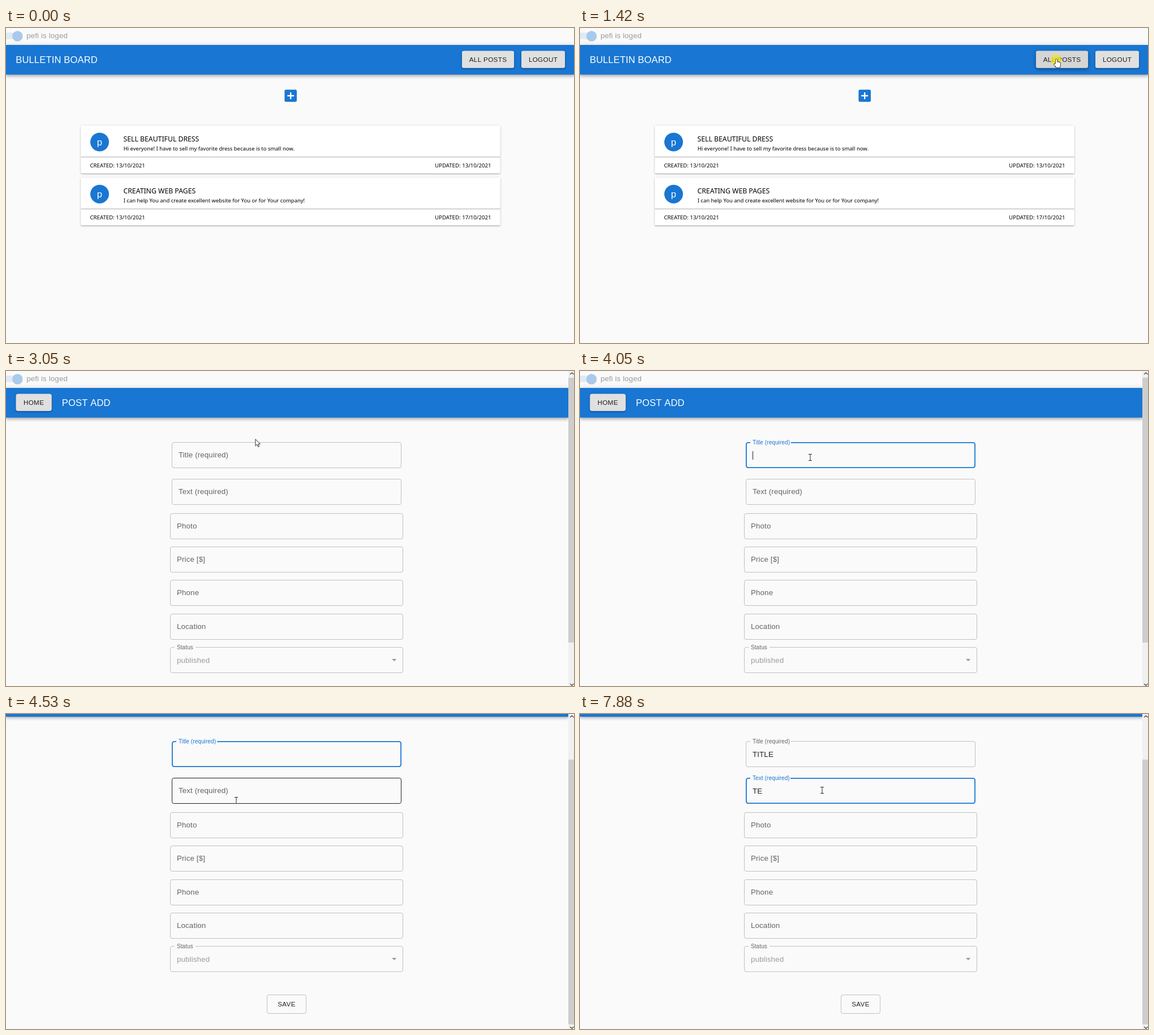
An HTML page with a canvas for the animation above (8 s loop, 1004 by 558 pixels).

```html
<!DOCTYPE html>
<html lang="en">
<head>
<meta charset="utf-8">
<title>Bulletin board</title>
<style>
html, body { margin: 0; width: 100%; height: 100%; overflow: hidden; background: #fafafa; }
canvas { display: block; }
</style>
</head>
<body>
<canvas id="stage" width="1004" height="558"></canvas>
<script>
const ctx = document.getElementById('stage').getContext('2d');
const W = 1004, H = 558, LOOP = 8000;
const BLUE = '#1976d2', PAGE = '#fafafa', INK = 'rgba(0,0,0,.87)';
const SOFT = 'rgba(0,0,0,.6)', FAINT = 'rgba(0,0,0,.38)', LINE = 'rgba(0,0,0,.23)';
const SANS = '"Liberation Sans", Arial, sans-serif';
const HUMAN = '"Noto Sans", "Open Sans", sans-serif';

const TO_LIST = 1630, TO_FORM = 2820, SCROLL_START = 4230;
const FOCUS_TITLE = 3850, TYPE_TITLE = 5600, FOCUS_TEXT = 6740, TYPE_TEXT = 7750;
const BLINK = 540, CLICKS = [1400, 2690, 3770, 6680], CLICK_LENGTH = 130;

// Pointer start and moves: [from time, to time, x, y]
const ENTER = { t: 190, x: 958, y: 556 };
const MOVES = [
  [190, 930, 848, 83], [930, 1220, 842, 55], [1640, 2360, 498, 127],
  [2840, 3110, 425, 119], [3110, 3520, 407, 153], [6470, 6680, 428, 135]
];

const DRESS = ['p', 'SELL BEAUTIFUL DRESS', 'Hi everyone! I have to sell my favorite dress because is to small now.', '13'];
const WEB = ['p', 'CREATING WEB PAGES', 'I can help You and create excellent website for You or for Your company!', '17'];
const CAR = ['m', 'SELL RED CAR', 'I want to sell 2 years old red, fast car!', '13'];
const HOUSE = ['m', 'RENT A BIG HOUSE', 'Hi! I would like to rent my beautiful house! Look at photo please!', '13'];

const clamp = v => Math.max(0, Math.min(1, v));
const easeOut = (v, power = 3) => 1 - (1 - clamp(v)) ** power;
const within = (t, a, b) => t >= a && t < b;
const inside = (p, x, y, w, h) => p && within(p.x, x, x + w) && within(p.y, y, y + h);
const typed = (word, t, start, step) => word.slice(0, Math.max(0, Math.floor((t - start) / step) + 1));
const blink = since => Math.floor(since / BLINK) % 2 === 0;

function pointerAt(t) {
  if (t < ENTER.t) return null;
  let { x, y } = ENTER;
  for (const [from, to, toX, toY] of MOVES) {
    const k = clamp((t - from) / (to - from));
    x += (toX - x) * k;
    y += (toY - y) * k;
  }
  return { x, y };
}

function rect(x, y, w, h, r, color) {
  ctx.fillStyle = color;
  ctx.beginPath();
  ctx.roundRect(x, y, w, h, r);
  ctx.fill();
}

// Filled box with a close and a wide shadow that grow with its height
function raised(x, y, w, h, r, color, height) {
  const shadow = (dy, blur, alpha) => {
    ctx.shadowColor = `rgba(0,0,0,${alpha})`;
    ctx.shadowOffsetY = dy;
    ctx.shadowBlur = blur;
    rect(x, y, w, h, r, color);
  };
  shadow(height * .8, height * 1.2, .22);
  shadow(.8, height * 2.2, .18);
  ctx.shadowColor = 'transparent';
  rect(x, y, w, h, r, color);
}

function disc(x, y, r, color) {
  ctx.fillStyle = color;
  ctx.beginPath();
  ctx.arc(x, y, r, 0, 7);
  ctx.fill();
}

function text(s, x, y, size, color, { font = SANS, align = 'left', space = .00938 } = {}) {
  ctx.font = `${size}px ${font}`;
  ctx.letterSpacing = `${space * size}px`;
  ctx.textAlign = align;
  ctx.fillStyle = color;
  ctx.fillText(s, x, y);
}

const caps = (s, x, y, color) => text(s, x, y, 11.67, color, { align: 'center', space: .02857 });

function button(label, x, w, p) {
  const hover = inside(p, x, 41, w, 30);
  raised(x, 40.8, w, 29.8, 3.3, hover ? '#d5d5d5' : '#e0e0e0', hover ? 4 : 2);
  caps(label, x + w / 2, 60, INK);
  return hover;
}

function topBar(width, title, x) {
  rect(-4, 8.3, 29, 11.4, 5.7, '#dfeaf5');
  raised(11.8, 5.5, 17.2, 17.2, 8.6, '#a7caed', .8);
  text('pefi is loged', 36.2, 18, 13.33, FAINT);
  raised(0, 30, width, 52.3, 0, BLUE, 4);
  text(title, x, 62, 16.6, '#fff', { space: .0075 });
}

function card([letter, title, body, updated], x, y, p) {
  const hover = inside(p, x, y, 741, 55), style = { font: HUMAN, space: 0 };
  raised(x, y, 741, 84.2, 1, '#fff', 1.8);
  if (hover) rect(x, y, 741, 55, 0, 'rgba(0,0,0,.04)');
  rect(x, Math.round(y + 54.6), 741, 1, 0, '#adadad');
  disc(x + 33, y + 29, 16.5, BLUE);
  const line = (s, dx, dy, size, align) => text(s, x + dx, Math.round(y + dy), size, '#000', { ...style, align });
  text(letter, x + 33, Math.round(y + 34.8), 16.67, '#fff', { align: 'center' });
  line(title, 75, 27.6, 12.25);
  line(body, 75.2, 44, 9.46);
  line('CREATED: 13/10/2021', 16, 73.7, 9.67);
  line(`UPDATED: ${updated}/10/2021`, 725, 73.7, 9.67, 'right');
  return hover;
}

function listPage(t, p, all) {
  const left = all ? 125.6 : 132.5, plusX = all ? 485.2 : 492.4;
  topBar(all ? 994 : W, 'BULLETIN BOARD', 17.2);
  let hand = all ? button('MY POSTS', 796, 88, p) : button('ALL POSTS', 806, 92, p);
  hand = button('LOGOUT', all ? 897 : 911, 77, p) || hand;

  rect(plusX, 109.2, 21.6, 21.6, 2.4, BLUE);
  rect(plusX + 4.8, 118.8, 12, 2.4, 0, '#fff');
  rect(plusX + 9.6, 114, 2.4, 12, 0, '#fff');
  hand = inside(p, plusX, 109, 22, 22) || hand;

  const posts = all ? [CAR, HOUSE, DRESS, WEB] : [DRESS, WEB];
  posts.forEach((post, i) => { hand = card(post, left, 173 + i * 92.15, p) || hand; });

  if (all && t >= 2390) {
    ctx.globalAlpha = clamp((t - 2390) / 190);
    rect(513, 109, 49.6, 21.6, 3, BLUE);
    ctx.globalAlpha = 1;
    caps('ADD', 538, 123, '#fff');
    rect(-4, 546.5, 116, 20, 2, '#dcdcdc');
    rect(-4, 547.5, 115, 20, 2, '#f8f8f8');
    text('webserver:4180/note/new', 1.5, 560, 8.7, '#5f6368', { font: HUMAN, space: 0 });
  }
  return hand ? 'hand' : 'arrow';
}

// Box with an opening of the given width in its top edge
function outline(x, y, w, h, gapX, gap, color, width) {
  const k = width / 2, l = x + k, r = x + w - k, top = y + k, b = y + h - k, c = 3.3;
  ctx.strokeStyle = color;
  ctx.lineWidth = width;
  ctx.beginPath();
  ctx.moveTo(gapX + gap, top);
  ctx.arcTo(r, top, r, b, c);
  ctx.arcTo(r, b, l, b, c);
  ctx.arcTo(l, b, l, top, c);
  ctx.arcTo(l, top, r, top, c);
  ctx.lineTo(gapX, top);
  ctx.stroke();
}

function field(label, x, w, top, p, { lift = 0, focus, value = '', caret, gap = 0, disabled } = {}) {
  const y = Math.round(top), hover = !disabled && inside(p, x, y, w, 46);
  outline(x, y, w, 46, x + 8, gap * lift, focus ? BLUE : hover ? INK : LINE, focus ? 1.8 : 1);
  text(label, x + 12, y + 27 - 23.5 * lift, 13.33 * (1 - .25 * lift), focus ? BLUE : SOFT);
  text(value, x + 12, y + 28, 13.33, disabled ? FAINT : INK);
  if (caret) rect(Math.floor(x + 12 + ctx.measureText(value).width), y + 16, 1, 15, 0, '#222');
  return hover;
}

function formPage(t, p, scroll) {
  ctx.save();
  ctx.translate(0, -scroll);
  topBar(994, 'POST ADD', 98.8);
  const onHome = button('HOME', 17.8, 62.6, p && { x: p.x, y: p.y + scroll });
  ctx.restore();

  const titleFocus = within(t, FOCUS_TITLE, FOCUS_TEXT), textFocus = t >= FOCUS_TEXT;
  const title = typed('TITLE', t, TYPE_TITLE, 117), body = typed('TEXT', t, TYPE_TEXT, 130);
  const hovers = [
    field('Title (required)', 293, 406, 125.9 - scroll, p, {
      lift: easeOut((t - FOCUS_TITLE) / 200), focus: titleFocus, gap: 72, value: title,
      caret: titleFocus && (title || blink(t - FOCUS_TITLE))
    }),
    field('Text (required)', 293, 406, 190.9 - scroll, p, {
      lift: easeOut((t - FOCUS_TEXT) / 200), focus: textFocus, gap: 71, value: body,
      caret: textFocus && !body && blink(t - FOCUS_TEXT)
    }),
    ...['Photo', 'Price [$]', 'Phone', 'Location'].map((label, i) =>
      field(label, 290, 412, 251.6 + i * 59.4 - scroll, p))
  ];
  field('Status', 290, 412, 489.1 - scroll, p, { lift: 1, gap: 37, value: 'published', disabled: true });

  ctx.fillStyle = FAINT;
  polygon([[682, 0], [690.4, 0], [686.2, 4.2]].map(([x, y]) => [x, y + Math.round(510.1 - scroll)]));

  const saveY = Math.round(574.8 - scroll);
  outline(461, saveY, 70, 34, 470, 0, LINE, 1);
  caps('SAVE', 496, saveY + 21, INK);
  return hovers.includes(true) ? 'beam' : onHome ? 'hand' : 'arrow';
}

function polygon(points) {
  ctx.beginPath();
  points.forEach(([x, y]) => ctx.lineTo(x, y));
  ctx.closePath();
  ctx.fill();
}

function chevron(y, dir) {
  ctx.strokeStyle = '#505050';
  ctx.lineWidth = 1.4;
  ctx.beginPath();
  ctx.moveTo(997, y + 1.6 * dir);
  ctx.lineTo(1000.3, y - 1.6 * dir);
  ctx.lineTo(1003.6, y + 1.6 * dir);
  ctx.stroke();
}

function scrollbar(top, length) {
  rect(994, 0, 10, H, 0, '#f0f0f0');
  rect(994, top, 10, length, 0, '#cdcdcd');
  chevron(4.5, 1);
  chevron(555.5, -1);
}

const CURSORS = {
  arrow() {
    polygon([[0, 0], [0, 12], [2.8, 9.4], [4.8, 13.6], [6.6, 12.8], [4.7, 8.7], [8.4, 8.5]]);
    ctx.stroke();
  },
  // Palm, thumb and finger: outlines first, then the white inside
  hand() {
    ctx.beginPath();
    ctx.roundRect(-1.2, 5.4, 8, 9.6, 2.4);
    ctx.roundRect(-3.8, 8.4, 4.5, 3.6, 1.5);
    ctx.roundRect(-1.2, 0, 2.4, 10, 1.2);
    ctx.stroke();
    ctx.fill();
  },
  beam() {
    ctx.beginPath();
    for (const y of [-5.5, 5.5]) {
      ctx.moveTo(-3, y);
      ctx.lineTo(3, y);
    }
    ctx.moveTo(0, -5.5);
    ctx.lineTo(0, 5.5);
    ctx.stroke();
  }
};

function drawPointer(t, p, kind) {
  if (!p) return;
  if (CLICKS.some(at => within(t, at, at + CLICK_LENGTH))) disc(p.x - .5, p.y + 1.5, 9.3, 'rgba(240,228,20,.78)');
  ctx.save();
  ctx.translate(p.x, p.y);
  ctx.fillStyle = '#fff';
  ctx.strokeStyle = '#2a2a2a';
  ctx.lineWidth = kind === 'hand' ? 1.6 : 1;
  CURSORS[kind]();
  ctx.restore();
}

function draw(t) {
  rect(0, 0, W, H, 0, PAGE);
  const p = pointerAt(t);
  let kind;
  if (t < TO_FORM) {
    const all = t >= TO_LIST;
    kind = listPage(t, p, all);
    if (all) scrollbar(12, 535);
  } else {
    const scroll = 77.7 * easeOut((t - SCROLL_START) / 300, 1.5);
    kind = formPage(t, p, scroll);
    scrollbar(12 + scroll * .885, 469);
  }
  drawPointer(t, p, kind);
}

const begin = performance.now();
function tick() {
  draw((performance.now() - begin) % LOOP);
  requestAnimationFrame(tick);
}
tick();
</script>
</body>
</html>
```
